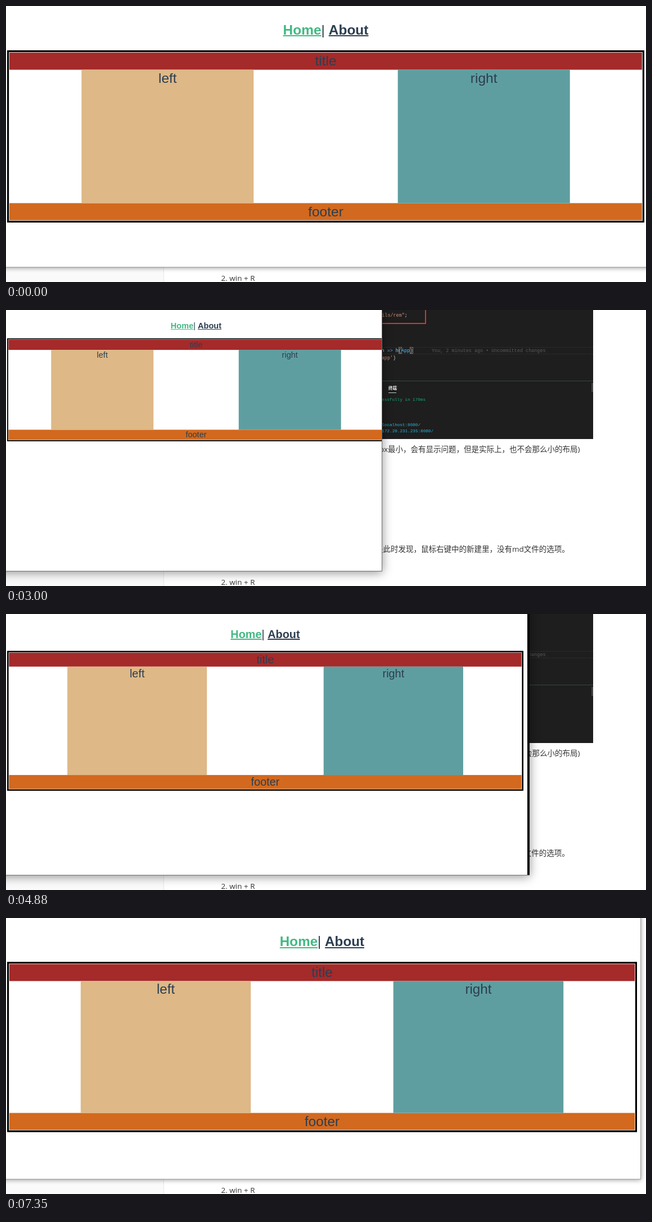
These frames come from a looping animation (1138 px wide and 492 px high, 7430 ms). An HTML page with a canvas:

```html
<!DOCTYPE html>
<html lang="zh-CN">
<head>
<meta charset="utf-8">
<title>Responsive rem layout</title>
<style>
  html, body { margin: 0; width: 100%; height: 100%; overflow: hidden; background: #fff; }
  canvas { display: block; width: 1138px; height: 492px; }
</style>
</head>
<body>
<canvas id="stage" width="1138" height="492"></canvas>
<script>
const ctx = document.getElementById('stage').getContext('2d');
const LOOP = 7430, STAGE_W = 1138, STAGE_H = 492, BOTTOM = 465;
const SANS = '"Liberation Sans", Arial, sans-serif';
const BODY = '13.5px "Open Sans", "Noto Sans CJK SC", "Noto Sans CJK", sans-serif';
const MONO = '"Liberation Mono", monospace';
const INK = '#2c3e50';

// Screen updates: [first, last, count]
const RUNS = [
  [0, 0, 1], [130, 290, 3], [440, 600, 3], [1300, 1300, 1],
  [1450, 2160, 10], [2230, 2920, 10], [3000, 3700, 10],
  [3930, 4640, 10], [4710, 5420, 10], [5490, 5800, 5],
  [6030, 6720, 10], [6800, 6800, 1], [7350, 7350, 1]
];

// [time, window edge, width the page was last laid out for]
const RESIZE = [
  [0, 1142, 1142], [1371, 1142, 1142], [1766, 1056, 1065], [2160, 948, 956],
  [2920, 698, 708], [3000, 669, 681], [3350, 590, 596], [3700, 560, 560],
  [3851, 560, 560], [4246, 691, 683], [4640, 875, 868], [4868, 931, 927],
  [5420, 1074, 1071], [5600, 1110, 1108], [5800, 1129, 1129]
];

// [time, x, y]
const POINTER_IN = [[130, 1018, 413], [210, 1065, 200], [290, 1051, 64], [440, 1030, 32], [520, 1010, 2]];
const POINTER_OUT = [[6030, 1112, -4], [6183, 1010, 50], [6413, 842, 210], [6567, 890, 350], [6720, 978, 481]];

function updateTime(t) {
  const [first, last, count] = RUNS.filter(run => run[0] <= t).pop();
  if (count === 1) return first;
  const step = (last - first) / (count - 1);
  return first + step * Math.min(count - 1, Math.floor((t - first) / step + 0.15));
}

function sample(keys, t) {
  const next = keys.findIndex(key => key[0] > t);
  if (next < 0) return keys[keys.length - 1].slice(1);
  if (next === 0) return keys[0].slice(1);
  const a = keys[next - 1], b = keys[next];
  const k = (t - a[0]) / (b[0] - a[0]);
  return a.slice(1).map((v, i) => v + (b[i + 1] - v) * k);
}

function rect(x, y, w, h, color) {
  ctx.fillStyle = color;
  ctx.fillRect(x, y, w, h);
}

function text(str, x, y, font, color, align = 'left') {
  ctx.font = font;
  ctx.fillStyle = color;
  ctx.textAlign = align;
  ctx.fillText(str, x, y);
}

// Coloured pieces of one code line, starting at x
function code(pieces, x, y, size = 8.45) {
  for (const [str, color] of pieces) {
    text(str, x, y, `${size}px ${MONO}`, color);
    x += ctx.measureText(str).width;
  }
}

function drawEditor() {
  rect(400, 0, 644, 230, '#1e1e1e');
  code([['import ', '#c586c0'], ['"./utils/rem"', '#ce9178'], [';', '#d4d4d4']], 607.5, 12);
  ctx.strokeStyle = '#e5302c';
  ctx.lineWidth = 2;
  ctx.strokeRect(580, -10, 166, 34);

  rect(400, 66, 644, 1, '#2a2a2a');
  rect(400, 78, 644, 1, '#2a2a2a');
  code([['render: ', '#9cdcfe'], ['h ', '#9cdcfe'], ['=> ', '#569cd6'], ['h', '#9cdcfe'],
        ['(', '#d4d4d4'], ['App', '#4fc1ff'], [')', '#d4d4d4']], 627, 75);
  ctx.strokeStyle = '#777';
  ctx.lineWidth = 1;
  ctx.strokeRect(698.5, 66.5, 5, 11);
  ctx.strokeRect(718.5, 66.5, 5, 11);
  text('You, 2 minutes ago • Uncommitted changes', 757, 75, `8.45px ${MONO}`, '#585858');
  code([['}).$mount(', '#d4d4d4'], ["'#app'", '#ce9178'], [')', '#d4d4d4']], 607, 88);

  rect(400, 126, 644, 1, '#3c4444');
  rect(1041, 130, 3, 16, '#424242');
  const tab = '7.5px "Noto Sans CJK SC", "Noto Sans CJK", sans-serif';
  text('调试控制台', 664, 142, tab, '#8a8a8a', 'right');
  text('终端', 680, 142, 'bold ' + tab, '#f0f0f0');
  rect(680, 147, 14, 1, '#ccc');
  const term = `7.65px ${MONO}`;
  text('Compiled successfully in 170ms', 746, 162, term, '#16a878', 'right');
  text('- Local:   http://localhost:8080/', 737, 207, term, '#29b8db', 'right');
  text('- Network: http://172.20.231.235:8080/', 760, 218, term, '#29b8db', 'right');
}

function drawDocument() {
  rect(0, 0, STAGE_W, STAGE_H, '#fff');
  rect(0, 0, 280, STAGE_H, '#fafafa');
  rect(280, 0, 1, STAGE_H, '#e8e8e8');
  drawEditor();
  text('(12px', 679, 253, BODY, '#333', 'right');
  text('最小，会有显示问题，但是实际上，也不会那么小的布局)', 679, 253, BODY, '#333');
  text('但是', 670.5, 431, BODY, '#333', 'right');
  text('此时发现，鼠标右键中的新建里，没有md文件的选项。', 670.5, 431, BODY, '#333');
  text('y,', 430, 463, BODY, '#333');
  text('2. win + R', 382.5, 490, BODY, '#333');
}

function link(str, x, y, size, color) {
  text(str, x, y, `bold ${size}px ${SANS}`, color);
  const width = ctx.measureText(str).width;
  rect(x, Math.round(y + size * 0.05), width, Math.max(1, Math.round(size * 0.08)), color);
  return x + width;
}

function drawPage(pageWidth) {
  const width = pageWidth - 5, s = width / 1137, size = 24.5 * s;
  const font = `${size}px ${SANS}`;
  const label = (str, x, top) => text(str, x, top + 23.3 * s, font, INK, 'center');

  const navY = 6.6 + 44.4 * s;
  let x = width / 2 - 76 * s;
  x = link('Home', x, navY, size, '#42b983');
  text('| ', x, navY, font, INK);
  x += ctx.measureText('| ').width;
  link('About', x, navY, size, INK);

  const top = 8.7 + 70.3 * s, bottom = 11.2 + 374.8 * s;
  const border = 3.2 * s, inset = 4 * s + 0.1, bar = 30.5 * s;
  rect(2, top, width - 4, bottom - top, '#000');
  rect(2 + border, top + border, width - 4 - 2 * border, bottom - top - 2 * border, '#fff');

  const left = 2 + inset, inner = width - 2 * left;
  const titleY = top + inset, bodyY = titleY + bar, footerY = bottom - inset - bar;
  rect(left, titleY, inner, bar, '#a52a2a');
  rect(left, footerY, inner, bar, '#d2691e');
  label('title', width / 2, titleY);
  label('footer', width / 2, footerY);

  const column = 306 * s, gap = (inner - 2 * column) / 4;
  [['left', '#deb887'], ['right', '#5f9ea0']].forEach(([name, color], i) => {
    const colX = left + gap + i * (column + 2 * gap);
    rect(colX, bodyY, column, footerY - bodyY, color);
    label(name, colX + column / 2, bodyY);
  });
}

function drawWindow(edge, pageWidth, focused) {
  ctx.save();
  ctx.shadowColor = focused ? 'rgba(0,0,0,.45)' : 'rgba(0,0,0,.4)';
  ctx.shadowBlur = focused ? 17 : 8;
  ctx.shadowOffsetY = focused ? 2 : 1;
  rect(-60, -60, edge + 60, BOTTOM + 61, focused ? '#707070' : '#a0a0a0');
  ctx.restore();

  ctx.save();
  ctx.beginPath();
  ctx.rect(0, 0, edge - 1, BOTTOM);
  ctx.clip();
  rect(0, 0, edge, BOTTOM, '#fff');
  drawPage(pageWidth);
  ctx.restore();
  if (pageWidth < edge) rect(pageWidth, 0, edge - pageWidth, BOTTOM, '#000');
}

function drawPointer(x, y) {
  ctx.beginPath();
  [[0, 0], [0, 13], [3, 10.2], [5, 15], [7, 14], [5, 9.5], [9, 9.2]]
    .forEach(([dx, dy]) => ctx.lineTo(x + 0.5 + dx, y + 0.5 + dy));
  ctx.closePath();
  ctx.fillStyle = '#fff';
  ctx.fill();
  ctx.strokeStyle = '#000';
  ctx.lineWidth = 0.8;
  ctx.stroke();
}

function draw(time) {
  const t = updateTime(time);
  const [edge, pageWidth] = sample(RESIZE, t).map(Math.round);
  drawDocument();
  drawWindow(edge, pageWidth, t >= 1300 && t < 7350);
  if (t >= 130 && t < 600) drawPointer(...sample(POINTER_IN, t));
  if (t >= 6030 && t < 6800) drawPointer(...sample(POINTER_OUT, t));
}

const start = performance.now();
function tick() {
  draw((performance.now() - start) % LOOP);
  requestAnimationFrame(tick);
}
tick();
</script>
</body>
</html>
```
